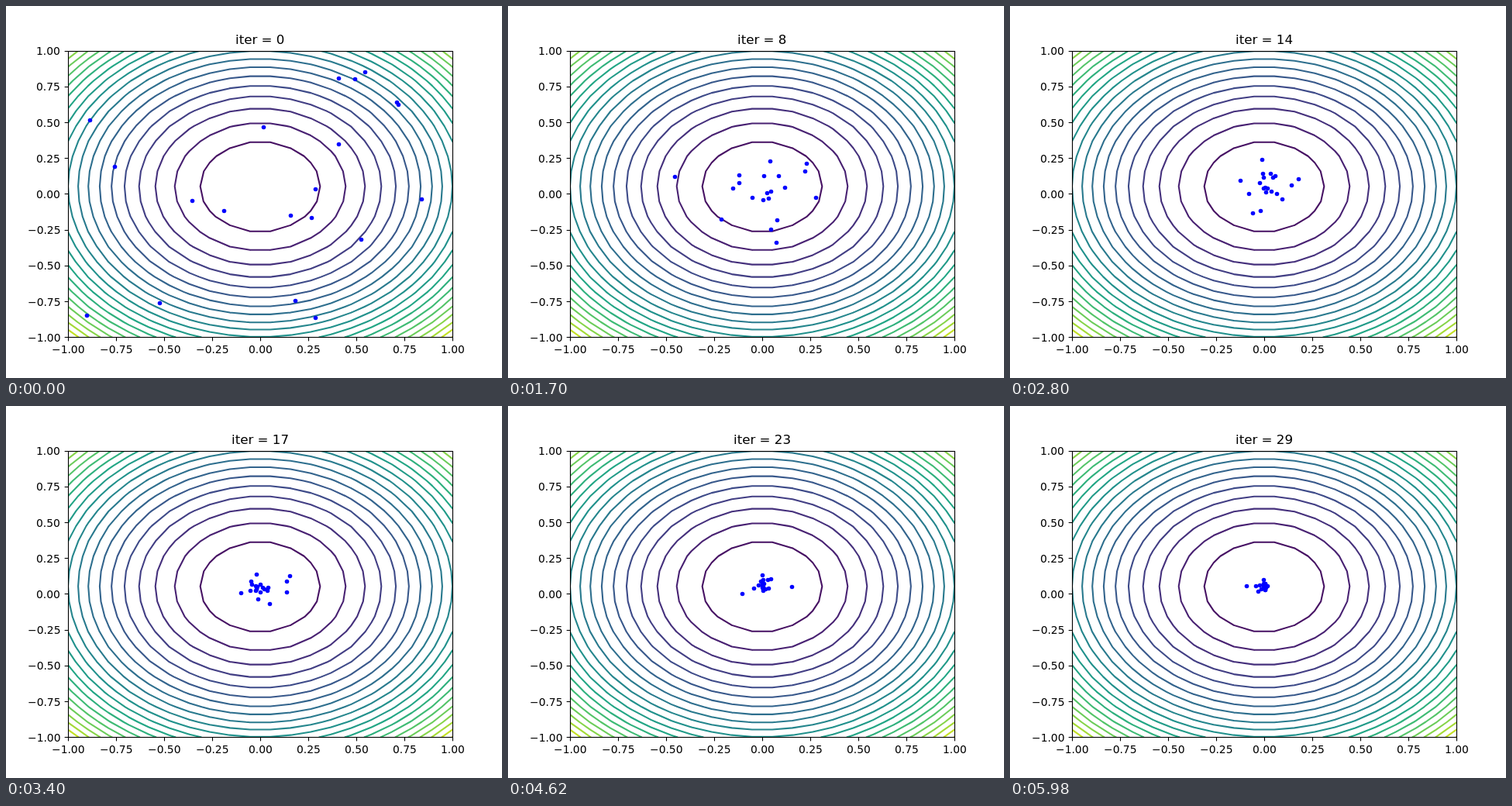
Animation, 640 px wide and 480 px high, one loop 6 s. Source, as an HTML page with a canvas:

```html
<!DOCTYPE html>
<html lang="en">
<head>
<meta charset="utf-8">
<title>Swarm on a contour plot</title>
<style>
html, body { margin: 0; width: 100%; height: 100%; overflow: hidden; background: #fff; }
canvas { display: block; width: 640px; height: 480px; }
</style>
</head>
<body>
<canvas id="stage" width="640" height="480"></canvas>
<script>
const ctx = document.getElementById('stage').getContext('2d');
const LOOP = 6000, STEP = 20, ITER = 200;
const L = 80, T = 57.6, W = 496, H = 369.6;
const px = x => L + (x + 1) / 2 * W;
const py = y => T + (1 - y) / 2 * H;
const snap = v => Math.floor(v + 0.5) + 0.5;
const lerp = (a, b, k) => a + (b - a) * k;
const left = snap(L), right = snap(L + W), top_ = snap(T), bottom = snap(T + H);

// ---- contour lines of x² + (y - 0.05)² on a 20 x 20 grid ----
const GRID = 20, TOP_LEVEL = 2.2;
const VIRIDIS = ['440154', '482475', '414487', '355f8d', '2a788e', '21918c',
  '22a884', '44bf70', '7ad151', 'bddf26', 'fde725'];
const node = i => -1 + 2 * i / (GRID - 1);
const height = (x, y) => x * x + (y - 0.05) ** 2;

function viridis(v) {
  const s = v * (VIRIDIS.length - 1), i = Math.min(Math.floor(s), VIRIDIS.length - 2);
  const part = (hex, c) => parseInt(hex.substr(c * 2, 2), 16);
  const rgb = [0, 1, 2].map(c => Math.round(lerp(part(VIRIDIS[i], c), part(VIRIDIS[i + 1], c), s - i)));
  return `rgb(${rgb})`;
}

function contour(level) {
  const path = new Path2D();
  for (let j = 0; j < GRID - 1; j++) {
    for (let i = 0; i < GRID - 1; i++) {
      const x0 = node(i), x1 = node(i + 1), y0 = node(j), y1 = node(j + 1);
      const box = [[x0, y0], [x1, y0], [x1, y1], [x0, y1]];
      const cuts = [];
      box.forEach((a, n) => {
        const b = box[(n + 1) % 4], fa = height(...a), fb = height(...b);
        if ((fa < level) === (fb < level)) return;
        const k = (level - fa) / (fb - fa);
        cuts.push([px(lerp(a[0], b[0], k)), py(lerp(a[1], b[1], k))]);
      });
      if (cuts.length === 2) {
        path.moveTo(...cuts[0]);
        path.lineTo(...cuts[1]);
      }
    }
  }
  return { path, color: viridis(level / TOP_LEVEL) };
}
const contours = Array.from({ length: 21 }, (_, i) => contour((i + 1) / 10));

// ---- swarm: inertia plus a random pull towards the minimum ----
const INERTIA = 0.75, PULL = 1, KICK = 30;
const GOAL = [px(0), py(0.05)];
const STARTS = [[108, 147], [104, 399], [140, 207], [198, 383], [240, 251],
  [281, 264], [332, 156], [367, 270], [394, 273], [399, 236],
  [429, 178], [429, 93], [450, 94], [463, 85], [504, 124],
  [506, 127], [536, 249], [458, 301], [373, 380], [399, 402]];

function seeded(seed) {
  return () => {
    seed = (seed + 0x6D2B79F5) | 0;
    let t = Math.imul(seed ^ (seed >>> 15), 1 | seed);
    t = (t + Math.imul(t ^ (t >>> 7), 61 | t)) ^ t;
    return ((t ^ (t >>> 14)) >>> 0) / 4294967296;
  };
}
const random = seeded(7);

function track(start) {
  let pos = start, vel = start.map(() => (2 * random() - 1) * KICK);
  const knots = [pos];
  for (let k = 0; k < LOOP / ITER; k++) {
    vel = vel.map((v, a) => INERTIA * v + PULL * random() * (GOAL[a] - pos[a]));
    pos = pos.map((p, a) => p + vel[a]);
    knots.push(pos);
  }
  return knots;
}
const tracks = STARTS.map(track);

// ---- drawing ----
function line(x0, y0, x1, y1) {
  ctx.beginPath();
  ctx.moveTo(x0, y0);
  ctx.lineTo(x1, y1);
  ctx.stroke();
}

// anchor: 0.5 centres the text on x, 1 ends it there
function text(str, x, y, size, anchor) {
  ctx.font = `${size}px "DejaVu Sans", sans-serif`;
  ctx.fillText(str, Math.round(x - anchor * ctx.measureText(str).width), Math.round(y));
}

function drawAxes() {
  ctx.strokeStyle = ctx.fillStyle = '#000';
  ctx.lineWidth = 1.11;
  ctx.lineCap = 'butt';
  ctx.strokeRect(left, top_, right - left, bottom - top_);
  for (let i = 0; i <= 8; i++) {
    const v = -1 + i / 4, label = v.toFixed(2).replace('-', '\u2212');
    const x = snap(px(v)), y = snap(py(v));
    line(x, bottom, x, bottom + 4.86);
    line(left, y, left - 4.86, y);
    text(label, px(v), 448, 13.89, 0.5);
    text(label, 70.28, py(v) + 5.5, 13.89, 1);
  }
}

function drawSwarm(iter, part) {
  ctx.fillStyle = '#00f';
  for (const knots of tracks) {
    const [x, y] = knots[iter].map((p, a) => lerp(p, knots[iter + 1][a], part));
    ctx.beginPath();
    ctx.arc(snap(x), snap(y), 2.78, 0, Math.PI * 2);
    ctx.fill();
  }
}

function draw(t) {
  const now = Math.floor(t / STEP) * STEP;
  const iter = Math.floor(now / ITER), part = now % ITER / ITER;
  ctx.fillStyle = '#fff';
  ctx.fillRect(0, 0, 640, 480);

  ctx.save();
  ctx.beginPath();
  ctx.rect(left - 0.5, top_ - 0.5, right - left + 1, bottom - top_ + 1);
  ctx.clip();
  ctx.lineWidth = 2.08;
  ctx.lineCap = 'round';
  for (const c of contours) {
    ctx.strokeStyle = c.color;
    ctx.stroke(c.path);
  }
  drawSwarm(iter, part);
  ctx.restore();

  drawAxes();
  text('iter = ' + iter, L + W / 2, 49, 16.67, 0.5);
}

const start = performance.now();
function tick() {
  draw((performance.now() - start) % LOOP);
  requestAnimationFrame(tick);
}
tick();
</script>
</body>
</html>
```
